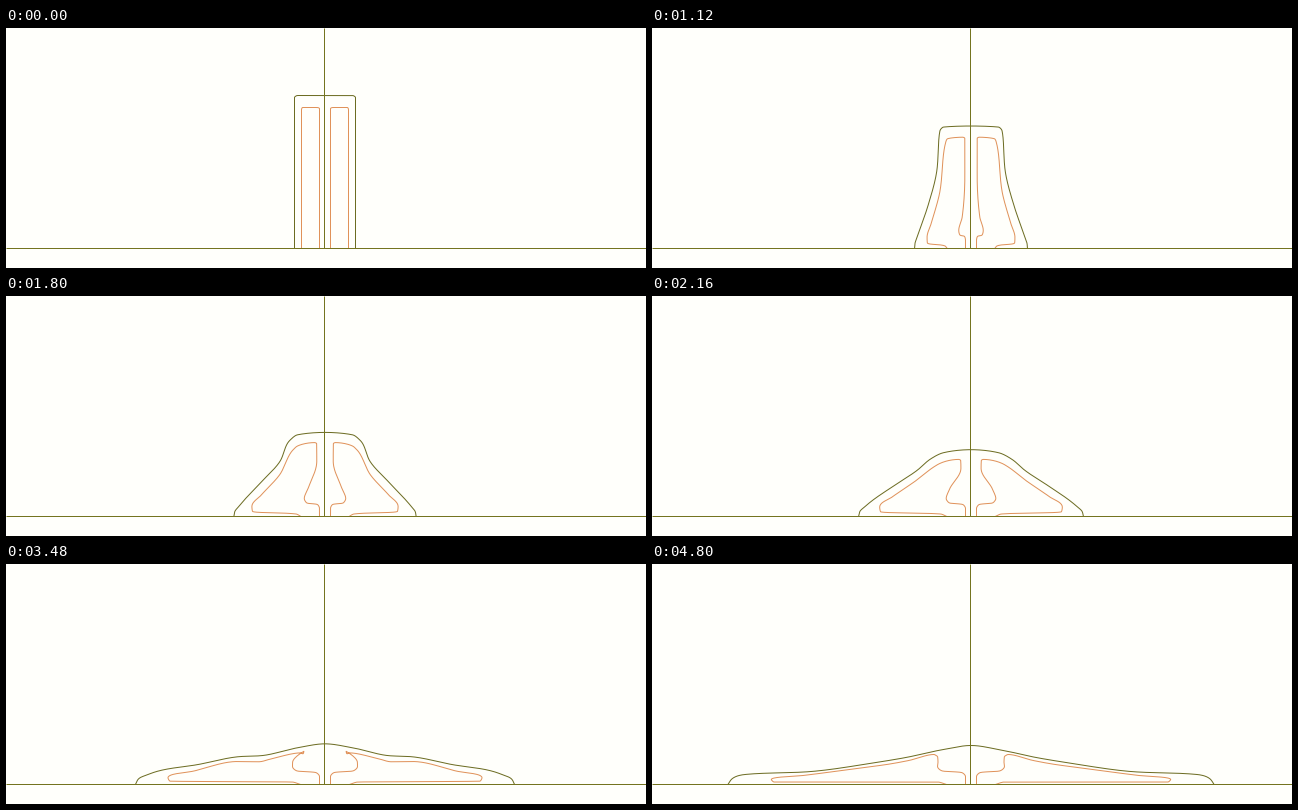
Animation of 640x240 px, one loop 4840 ms. Source, as a matplotlib script:

```python
import numpy as np
import matplotlib.pyplot as plt
from matplotlib.animation import FuncAnimation

W, H, DPI = 640, 240, 100
FRAMES, STEP = 121, 40
MIRROR = 637          # x + mirrored x
GROUND = 220

PAPER = "#fffffb"
INK = "#6c6c22"
AXIS = "#74741f"
EMBER = "#e0925a"

clock = np.arange(FRAMES) * STEP / 1000


def ease(tau, power):
    """Start from rest, settle towards 1 on the time scale tau (seconds)."""
    return 1 - np.exp(-(clock / tau) ** power)


def track(x, y, dx=0, run=0, dy=0, drop=0):
    """Path of one marker: start plus eased travel in each direction."""
    return np.column_stack([x + dx * run + 0 * clock,
                            y + dy * drop + 0 * clock])


fall = ease(1.86, 2.3)       # the top coming down
sink = ease(1.9, 1.4)        # the upper flank settling
settle = ease(2.34, 1.4)
creep = ease(3.06, 1.3)      # the lower flank settling
spread = ease(3.46, 1.96)    # the toe running out
slide = ease(3.3, 2.2)
push = ease(3.32, 2.05)      # the tip of the core
roll = ease(3.1, 3.55)       # the outer corner of the core
drift = ease(4.2, 3.0)       # the inner edge of the core
curl = ease(2.01, 2.2)       # the lobe near the axis
back = ease(2.23, 3.0)

# Right half of the surface, crest to toe
surface = np.stack([
    track(318.5, 67, dy=114, drop=fall),
    track(346, 67, dy=118, drop=fall),
    track(349, 69, 34.5, ease(2.68, 4.8), 124, fall),
    track(349, 110, 70, ease(2.97, 2.9), 91, sink),
    track(349, 165, 140, slide, 50, creep),
    *(track(349, y, dx, spread)
      for y, dx in ((210, 230), (215, 246), (GROUND, 250)))], axis=1)

# Right half of the core, from the axis round to the outer foot
core = np.stack([
    track(324, GROUND),
    track(324, 212),
    track(324, 208, 4, curl),
    track(324, 206.5, 23, curl),
    track(324, 202, 28, curl),
    track(324, 187, 27.5, back, 11, back),
    track(324, 120, 36, drift, 74, sink),
    track(324, 80, 38, drift, 111, fall),
    track(326, 79, 38, drift, 111, fall),
    track(341, 79, 40, roll, 117, fall),
    track(342, 81, 55, roll, 118, fall),
    track(342, 150, 95, slide, 57, settle),
    track(342, 193, 160, push, 20, push),
    track(342, 208, 200, push, 8, push),
    track(342, 214, 197, push, 4, push),
    track(342, 217.5, 10, curl),
    track(342, GROUND, 1, curl)], axis=1)


def flip(pts):
    return np.column_stack([MIRROR - pts[:, 0], pts[:, 1]])


def smooth(pts, n=300):
    """Cubic through the markers that never overshoots them."""
    h = np.hypot(*np.diff(pts, axis=0).T)
    dist = np.concatenate([[0], np.cumsum(h)])
    h = h[:, None]
    d = np.diff(pts, axis=0) / h
    m = np.vstack([d[:1], (d[:-1] * h[1:] + d[1:] * h[:-1])
                   / (h[1:] + h[:-1]), d[-1:]])
    cap = 2 * np.minimum(abs(d[:-1]), abs(d[1:]))
    cap[d[:-1] * d[1:] <= 0] = 0
    m[1:-1] = np.clip(m[1:-1], -cap, cap)

    at = np.linspace(0, dist[-1], n)
    i = np.clip(np.searchsorted(dist, at, side="right") - 1, 0, len(h) - 1)
    s = (at - dist[i])[:, None] / h[i]
    r = 1 - s
    return (pts[i] * (1 + 2 * s) * r**2 + pts[i + 1] * s**2 * (3 - 2 * s)
            + h[i] * s * r * (m[i] * r - m[i + 1] * s))


fig = plt.figure(figsize=(W / DPI, H / DPI), dpi=DPI, facecolor=PAPER)
ax = fig.add_axes([0, 0, 1, 1])
ax.set_xlim(0, W)
ax.set_ylim(H, 0)
ax.axis("off")


def stroke(color, z, xs=(), ys=(), snap=False):
    line, = ax.plot(xs, ys, color=color, lw=72 / DPI, zorder=z, snap=snap,
                    solid_joinstyle="round", solid_capstyle="butt")
    return line


stroke(AXIS, 3, [318, 318], [0, GROUND], snap=True)
stroke(AXIS, 4, [0, W], [GROUND, GROUND], snap=True)
shell = stroke(INK, 2)
halves = [stroke(EMBER, 1) for _ in range(2)]


def put(line, pts):
    line.set_data(*(pts.T + 0.5))


def draw(n):
    right = surface[n]
    put(shell, smooth(np.vstack([flip(right)[:0:-1], right]), 500))
    loop = smooth(core[n])
    put(halves[0], flip(loop))
    put(halves[1], loop)
    return [shell, *halves]


anim = FuncAnimation(fig, draw, frames=FRAMES, interval=STEP, repeat=True,
                     repeat_delay=0, blit=False)
plt.show()
```
